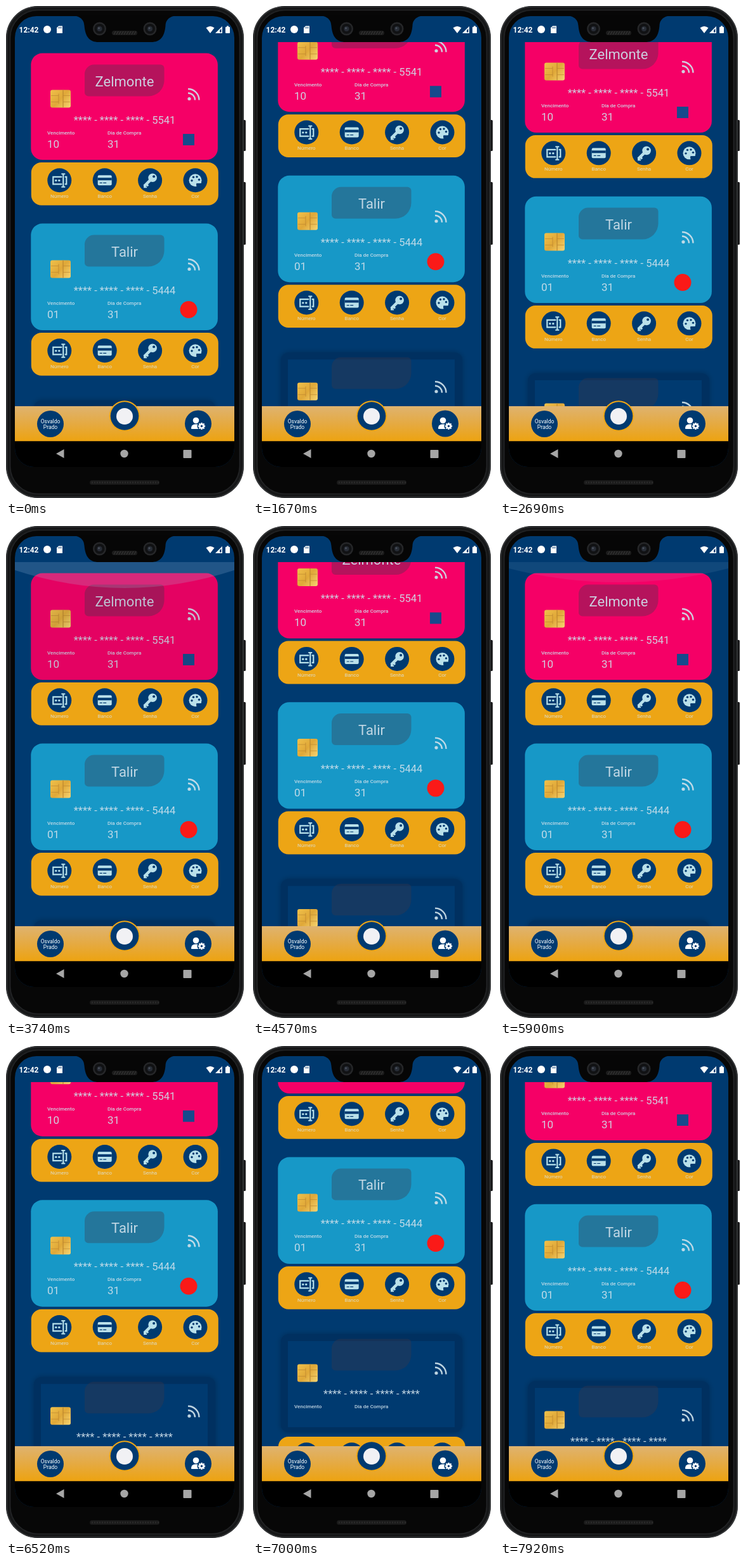
These frames come from a looping animation (380 px wide and 777 px high, 7990 ms). An HTML page with a canvas:

```html
<!DOCTYPE html>
<html lang="pt">
<head>
<meta charset="utf-8">
<title>Carteira</title>
<style>
html, body { margin: 0; width: 100%; height: 100%; overflow: hidden; background: #fff; }
canvas { display: block; width: 380px; height: 777px; }
</style>
</head>
<body>
<canvas id="stage" width="380" height="777"></canvas>
<script>
const g = document.getElementById('stage').getContext('2d');
const LOOP = 7990;
const NAVY = '#003a70', GOLD = '#eda515', ICE = '#b9e0ea', PALE = 'rgba(206,224,234,.92)';
const FONT = 'Roboto, "Noto Sans", sans-serif';

const CARDS = [
  { color: '#f50066', name: 'Zelmonte', end: '5541', due: '10', buy: '31', mark: 'square' },
  { color: '#1798c7', name: 'Talir', end: '5444', due: '01', buy: '31', mark: 'circle' },
  { color: null, name: '', end: '****', due: '', buy: '', mark: '' }
];

// start, end, from, to, ease-out power
const MOVES = [
  [1400, 2240, 0, 140, 2],
  [2410, 3040, 140, 0, 2],
  [4360, 5260, 0, 158, 2],
  [5260, 5660, 158, 0, 1.3],
  [6180, 7140, 0, 171.6, 2],
  [7290, 7990, 171.6, 85.4, 1]
];
// start, full, fade, end, depth, alpha
const GLOWS = [
  [3560, 3740, 3980, 4390, 41, 0.2],
  [5660, 5780, 5800, 6150, 38, 0.13]
];

const clamp = v => Math.max(0, Math.min(1, v));

function scrollAt(t) {
  let y = 0;
  for (const [a, b, from, to, n] of MOVES) {
    if (t >= a) y = to + (from - to) * Math.pow(1 - clamp((t - a) / (b - a)), n);
  }
  return y;
}

function box(x, y, w, h, r, fill) {
  g.beginPath();
  g.roundRect(x, y, w, h, r);
  g.fillStyle = fill;
  g.fill();
}

function frameLine(x, y, w, h, r, color, width) {
  g.beginPath();
  g.roundRect(x, y, w, h, r);
  g.strokeStyle = color;
  g.lineWidth = width;
  g.stroke();
}

function disc(x, y, r, fill) {
  g.beginPath();
  g.arc(x, y, r, 0, 7);
  g.fillStyle = fill;
  g.fill();
}

function poly(points, fill) {
  g.beginPath();
  points.forEach(p => g.lineTo(p[0], p[1]));
  g.closePath();
  g.fillStyle = fill;
  g.fill();
}

function line(points, color, width) {
  g.beginPath();
  points.forEach(p => g.lineTo(p[0], p[1]));
  g.strokeStyle = color;
  g.lineWidth = width;
  g.stroke();
}

function text(s, x, y, size, color, align = 'left', weight = 400) {
  g.font = `${weight} ${size}px ${FONT}`;
  g.textAlign = align;
  g.fillStyle = color;
  g.fillText(s, x, y);
}

function chip(x, y) {
  const grad = g.createLinearGradient(x, y, x + 32, y + 28);
  grad.addColorStop(0, '#f0c14b');
  grad.addColorStop(0.5, '#e0a838');
  grad.addColorStop(1, '#f6d472');
  box(x, y, 32, 28, 3, grad);
  const c = '#bd8730';
  line([[x + 20, y], [x + 20, y + 28]], c, 1.2);
  line([[x + 13, y + 6], [x + 13, y + 22]], c, 0.8);
  for (const dy of [9, 19]) {
    line([[x + 1, y + dy], [x + 13, y + dy]], c, 0.7);
    line([[x + 20, y + dy], [x + 31, y + dy]], c, 0.7);
  }
}

function waves(x, y) {
  disc(x, y, 2.6, PALE);
  g.strokeStyle = PALE;
  g.lineWidth = 2.4;
  for (const r of [11, 17.5]) {
    g.beginPath();
    g.arc(x - 2, y + 2, r, -Math.PI / 2, 0);
    g.stroke();
  }
}

const ICONS = [
  ['Número', () => {
    line([[4, -5.5], [-10, -5.5], [-10, 6], [4, 6]], ICE, 2.2);
    line([[8.5, -5.5], [11, -5.5], [11, 6], [8.5, 6]], ICE, 2.2);
    line([[3, -10], [9, -10]], ICE, 2);
    line([[3, 10.5], [9, 10.5]], ICE, 2);
    line([[6, -10], [6, 10]], ICE, 2.2);
    disc(-5.5, 0.3, 1.7, ICE);
    disc(-0.5, 0.3, 1.7, ICE);
  }],
  ['Banco', () => {
    box(-11, -8, 22, 16, 2, ICE);
    box(-11, -4, 22, 4, 0, NAVY);
    box(-8, 3.5, 4, 1.2, 0, NAVY);
    box(-2.5, 3.5, 5, 1.2, 0, NAVY);
  }],
  ['Senha', () => {
    line([[3, -3], [-9, 9]], ICE, 4.5);
    line([[-6, 6], [-3, 9]], ICE, 3);
    line([[-9, 7], [-9, 11], [-5, 11]], ICE, 2);
    disc(4, -4, 6.8, ICE);
    disc(6, -6, 2, NAVY);
  }],
  ['Cor', () => {
    disc(0, 0, 10, ICE);
    disc(5.5, 7, 4, NAVY);
    box(1.5, 1.5, 8, 3.2, 1.6, ICE);
    for (const [x, y] of [[-5.5, 0.5], [-3, -5], [2.5, -5.5], [6, -1]]) disc(x, y, 1.7, NAVY);
  }]
];

function actions(y) {
  box(39.8, y, 295, 67.8, 16, GOLD);
  ICONS.forEach(([label, draw], i) => {
    const x = 84.3 + i * 71.4;
    disc(x, y + 28.3, 19, NAVY);
    g.save();
    g.translate(x, y + 28.3);
    draw();
    g.restore();
    text(label, x, y + 56, 8, '#dcdcc8', 'center');
  });
}

function card(c, y, dim) {
  if (c.color) {
    box(39.3, y - 0.4, 294.6, 168.4, 18, c.color);
  } else {
    g.save();
    g.shadowColor = '#002b55';
    g.shadowBlur = 10;
    box(44, y + 10, 286, 155, 12, '#003060');
    g.restore();
    box(55, y + 21, 263, 136, 0, NAVY);
  }
  box(124, y + 17.5, 125.5, 50, [15, 6, 25, 6], 'rgba(62,55,72,.35)');
  text(c.name, 187, y + 51.5, 22, PALE, 'center');
  chip(70, y + 57.5);
  waves(289, y + 71.5);
  text('**** - **** - **** - ' + c.end, 187, y + 110.5, 16.5, PALE, 'center');
  text('Vencimento', 65, y + 127.5, 8.1, PALE, 'left', 500);
  text('Dia de Compra', 160, y + 127.5, 8.1, PALE, 'left', 500);
  text(c.due, 65, y + 148.5, 17, PALE);
  text(c.buy, 160, y + 148.5, 17, PALE);
  if (c.mark === 'square') box(279, y + 127, 18, 18, 0, '#174a8c');
  if (c.mark === 'circle') disc(288, y + 135.5, 13.5, '#fa1a18');
  if (dim) box(39.3, y - 0.4, 294.6, 168.4, 18, `rgba(0,30,50,${dim})`);
  actions(y + 172);
}

function glow(t) {
  for (const [a, full, fade, b, depth, alpha] of GLOWS) {
    if (t < a || t > b) continue;
    const k = clamp((t - a) / (full - a)) * clamp((b - t) / (b - fade));
    const h = depth * Math.sqrt(k), side = h * 0.31;
    g.beginPath();
    g.moveTo(14, 57);
    g.lineTo(14, 57 + side);
    g.quadraticCurveTo(187, 57 + 2 * h - side, 360, 57 + side);
    g.lineTo(360, 57);
    g.fillStyle = `rgba(165,195,225,${alpha * k})`;
    g.fill();
  }
}

function phone() {
  box(373, 180, 5, 49, 1.5, '#1b1b1d');
  box(373, 278, 5, 99, 1.5, '#1b1b1d');
  box(0, 0, 375, 777, 50, '#161718');
  frameLine(1.2, 1.2, 372.6, 774.6, 49, '#36383a', 1.6);
  frameLine(6.5, 6.5, 362, 764, 44, '#252628', 1.2);
  box(7.5, 7.5, 360, 762, 43, '#070707');
  box(132, 749, 110, 7, 3.5, '#1b1b1b');
  for (let x = 135; x < 240; x += 4) box(x, 751, 2, 3, 1, '#2b2b2b');
}

function notch() {
  g.beginPath();
  g.moveTo(106, 15);
  g.bezierCurveTo(120, 17, 123, 24, 123.5, 31);
  g.bezierCurveTo(125, 49, 132, 57, 146, 57);
  g.lineTo(229, 57);
  g.bezierCurveTo(243, 57, 250, 49, 251.5, 31);
  g.bezierCurveTo(252, 24, 255, 17, 269, 15);
  g.fillStyle = '#060606';
  g.fill();
  for (const x of [147.5, 227]) {
    disc(x, 36, 10.5, '#262729');
    disc(x, 36, 8, '#111214');
    disc(x, 36, 4, '#272c35');
    disc(x - 1, 35, 1.5, '#4a515c');
  }
  box(167, 39, 40, 7, 3.5, '#1c1c1c');
  for (let x = 170; x < 205; x += 4) line([[x, 45], [x + 3, 40]], '#3a3a3a', 1);
}

function status() {
  text('12:42', 20.5, 41.7, 12, '#fff', 'left', 700);
  disc(65, 37, 6, '#fff');
  poly([[83, 31.5], [89, 31.5], [89, 43], [80, 43], [80, 34.5]], '#fff');
  for (const x of [83, 85, 87]) box(x - 0.4, 33, 0.9, 2.5, 0, NAVY);
  g.beginPath();
  g.moveTo(322, 43);
  g.lineTo(315.5, 34.5);
  g.quadraticCurveTo(322, 29.5, 328.5, 34.5);
  g.fillStyle = '#fff';
  g.fill();
  poly([[341, 32], [341, 43], [330, 43]], '#fff');
  poly([[339.5, 36], [339.5, 41.5], [337, 41.5], [337, 38]], NAVY);
  box(346, 33, 7, 10, 1, '#fff');
  box(348, 31.5, 3, 2, 0, '#fff');
}

function gear(x, y) {
  for (let i = 0; i < 8; i++) {
    g.save();
    g.translate(x, y);
    g.rotate(i * Math.PI / 4);
    box(-1.2, -5.6, 2.4, 4, 0.4, '#fff');
    g.restore();
  }
  disc(x, y, 4.2, '#fff');
  disc(x, y, 1.7, NAVY);
}

function tabs() {
  const grad = g.createLinearGradient(0, 632, 0, 687);
  grad.addColorStop(0, '#dfb36f');
  grad.addColorStop(0.5, '#e5aa42');
  grad.addColorStop(1, '#eda311');
  box(14, 632, 346, 56, 0, grad);
  disc(70, 660, 21, NAVY);
  text('Osvaldo', 70, 658.5, 8.5, '#fff', 'center');
  text('Prado', 70, 668, 8.5, '#fff', 'center');
  disc(187, 647.5, 24.3, GOLD);
  disc(187, 647.5, 22.3, NAVY);
  disc(187, 648, 13, '#f1f1f4');
  disc(303, 659.5, 21, NAVY);
  disc(299.5, 654.5, 4.8, '#fff');
  box(292, 660.5, 15, 7.5, [6, 2, 1, 1], '#fff');
  disc(308.5, 663.5, 7, NAVY);
  gear(308.5, 663.5);
  box(14, 687.3, 346, 42, 0, '#000');
  poly([[79, 707], [91.5, 700], [91.5, 714]], '#a6a6a6');
  disc(186.5, 707, 6.2, '#a6a6a6');
  box(279.5, 701, 13, 13, 1, '#a6a6a6');
}

function draw(t) {
  g.clearRect(0, 0, 380, 777);
  phone();

  g.save();
  g.beginPath();
  g.roundRect(14, 16, 346, 712, [34, 34, 30, 30]);
  g.clip();
  box(14, 16, 346, 712, 0, NAVY);

  g.save();
  g.beginPath();
  g.rect(14, 57, 346, 575);
  g.clip();
  const top = 75 - scrollAt(t);
  const pressed = t >= 3400 && t < 4000 ? 0.07 : 0;
  CARDS.forEach((c, i) => card(c, top + i * 269, i === 0 ? pressed : 0));
  glow(t);
  g.restore();

  status();
  tabs();
  g.restore();
  notch();
}

const start = performance.now();
function tick() {
  draw((performance.now() - start) % LOOP);
  requestAnimationFrame(tick);
}
tick();
</script>
</body>
</html>
```
